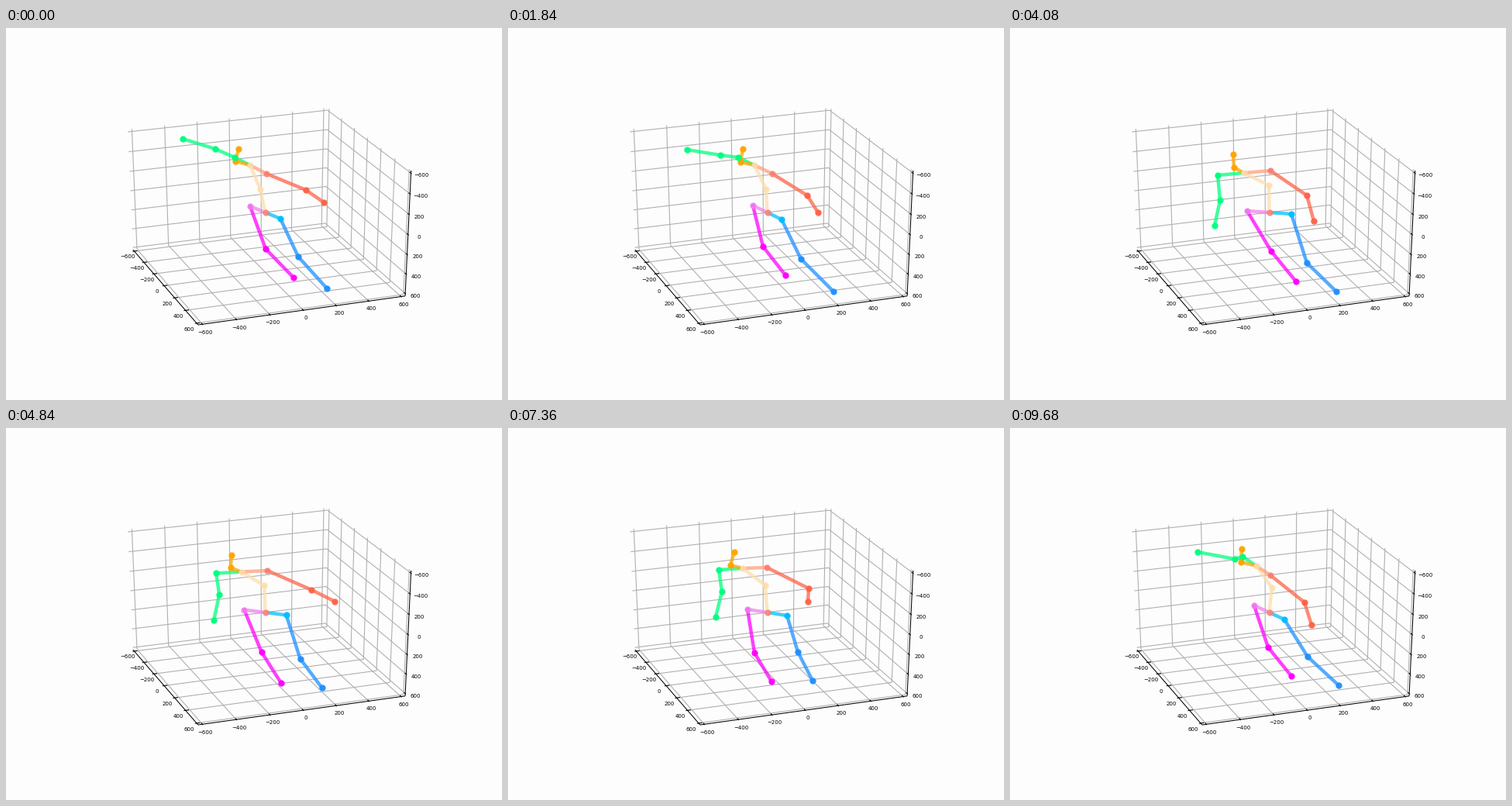
These frames come from a looping animation (640x480 px, 9.72 s). A matplotlib script:

```python
import numpy as np
import matplotlib.pyplot as plt
from matplotlib.animation import FuncAnimation
from matplotlib.collections import LineCollection

W, H, DPI = 640, 480, 100
FRAMES, STEP = 243, 40

# Camera and box
AZIM, ELEV, DIST = np.radians(-20), np.radians(27), 10
CENTER = np.array([334.7, 237.5])
SCALE = np.array([2681, 1998])
FLAT = 0.855                    # box height relative to its width
EDGE = 25 / 48                  # half width of the box, ticks reach 0.5
TICKS = np.linspace(-0.5, 0.5, 7)


def project(x, y, z):
    """Box coordinates to stage pixels; z points up."""
    z = z * FLAT
    ca, sa, ce, se = np.cos(AZIM), np.sin(AZIM), np.cos(ELEV), np.sin(ELEV)
    right = -sa * x + ca * y
    up = -se * (ca * x + sa * y) + ce * z
    depth = DIST - (ce * (ca * x + sa * y) + se * z)
    return CENTER + SCALE * np.array([right, -up]) / depth


def path(*points):
    return [project(*p) for p in points]


fig = plt.figure(figsize=(W / DPI, H / DPI), dpi=DPI, facecolor="#fdfdfd")
ax = fig.add_axes([0, 0, 1, 1])
ax.set_xlim(0, W)
ax.set_ylim(H, 0)
ax.axis("off")


def draw_box():
    e, pad, out, inn = EDGE, 0.037, 0.0083, 0.0167
    grid, marks = [], []
    for t in TICKS:
        grid += [
            path((t, -e, -e), (t, e, -e), (t, e, e)),
            path((e, t, -e), (-e, t, -e), (-e, t, e)),
            path((e, e, t), (-e, e, t), (-e, -e, t)),
        ]
        marks += [
            path((t, -e - out, -e), (t, -e + inn, -e)),
            path((e + out, t, -e), (e - inn, t, -e)),
            path((e + out, e, t), (e - inn, e, t)),
        ]
    edges = [
        path((-e, -e, -e), (e, -e, -e)),
        path((e, -e, -e), (e, e, -e)),
        path((e, e, -e), (e, e, e)),
    ]
    ax.add_collection(LineCollection(grid, colors="#b0b0b0", linewidths=0.8))
    ax.add_collection(LineCollection(edges + marks, colors="black", linewidths=0.75))

    names = ["−600", "−400", "−200", "0", "200", "400", "600"]
    heights = ["600", "400", "200", "0", "200", "−400", "−600"]
    o = e + pad
    for t, name, height in zip(TICKS, names, heights):
        spots = [((t, -o, -o), name), ((e + pad, t, -o), name), ((o, o, t), height)]
        for spot, text in spots:
            x, y = project(*spot)
            ax.text(x, y + 1, text, size=5, ha="center", va="center")


draw_box()

# Key poses of each joint, in stage pixels
POSE_T = [0, 1.84, 3.12, 4.08, 5.68, 7.36, 9.68]
PELVIS = (334.5, 238)
LEGS = {
    "hip_r": [(315, 230), (316, 229), (311, 231), (306, 236), (309, 233), (309, 234), (315, 229)],
    "knee_r": [(335, 285), (329, 282), (338, 286), (337, 288), (321, 290), (318, 290), (333, 283)],
    "foot_r": [(371, 322), (358, 319), (376, 327), (369, 327), (342, 331), (340, 327), (363, 320)],
    "knee_l": [(377, 295), (378, 298), (369, 306), (383, 303), (375, 292), (374, 289), (384, 295)],
    "foot_l": [(414, 336), (420, 340), (412, 341), (421, 340), (397, 331), (393, 326), (424, 332)],
}
TRUNK = {
    "spine": [(328, 208), (333, 208), (343, 204), (334, 203), (333, 204), (332, 203), (338, 206)],
    "chest": [(315, 177), (318, 177), (306, 189), (302, 187), (306, 184), (303, 181), (318, 178)],
    "nose": [(296, 172), (300, 173), (294, 180), (289, 180), (291, 181), (287, 177), (298, 173)],
    "head": [(300, 156), (303, 156), (293, 163), (288, 163), (294, 165), (292, 160), (299, 156)],
}
ARMS = {
    "arm_g": [(295, 167), (297, 167), (282, 180), (268, 190), (275, 184), (272, 183), (300, 166)],
    "elbow_g": [(270, 156), (274, 164), (284, 212), (271, 222), (280, 207), (276, 211), (290, 169)],
    "hand_g": [(228, 143), (231, 157), (276, 249), (264, 255), (273, 240), (268, 244), (242, 160)],
    "arm_o": [(336, 188), (341, 188), (330, 199), (336, 184), (338, 184), (334, 180), (336, 190)],
    "elbow_o": [(387, 209), (386, 216), (344, 238), (383, 216), (393, 211), (388, 207), (380, 225)],
    "hand_o": [(410, 225), (400, 238), (312, 266), (392, 249), (393, 229), (387, 224), (389, 254)],
}
# Swings between the key poses
SWINGS = {
    "foot_l": {1.0: (427, 345), 3.8: (425, 342)},
    "elbow_g": {1.0: (263, 157)},
    "hand_g": {1.0: (218, 142), 2.5: (245, 200), 9.04: (268, 222)},
    "elbow_o": {2.5: (398, 204), 4.45: (394, 208)},
    "hand_o": {2.5: (440, 208), 4.45: (433, 222)},
}
REST = 8.3      # the stance is held until here


def smooth(t, times, values):
    """Monotone cubic through the keys, without overshoot."""
    h = np.diff(times)
    slope = np.diff(values) / h
    tangent = np.zeros(len(times))
    a, b = slope[:-1], slope[1:]
    same = a * b > 0
    tangent[1:-1][same] = (2 * a * b)[same] / (a + b)[same]
    tangent[0], tangent[-1] = slope[0], slope[-1]
    i = np.clip(np.searchsorted(times, t, side="right") - 1, 0, len(h) - 1)
    u = (t - times[i]) / h[i]
    return (
        (1 + 2 * u) * (1 - u) ** 2 * values[i]
        + u * (1 - u) ** 2 * h[i] * tangent[i]
        + u * u * (3 - 2 * u) * values[i + 1]
        + u * u * (u - 1) * h[i] * tangent[i + 1]
    )


def make_tracks():
    t = np.arange(FRAMES) * STEP / 1000
    tracks = {"pelvis": np.tile(PELVIS, (FRAMES, 1))}
    for joint, points in {**LEGS, **TRUNK, **ARMS}.items():
        keys = dict(zip(POSE_T, points))
        keys[REST] = points[5]
        keys.update(SWINGS.get(joint, {}))
        times = np.array(sorted(keys), float)
        xy = np.array([keys[k] for k in sorted(keys)], float)
        tracks[joint] = np.column_stack([smooth(t, times, c) for c in xy.T])
    tracks["hip_l"] = 2 * tracks["pelvis"] - tracks["hip_r"]
    return tracks


TRACKS = make_tracks()

BONES = [
    ("pelvis", "hip_r", "violet"), ("hip_r", "knee_r", "magenta"),
    ("knee_r", "foot_r", "magenta"), ("pelvis", "hip_l", "deepskyblue"),
    ("hip_l", "knee_l", "dodgerblue"), ("knee_l", "foot_l", "dodgerblue"),
    ("chest", "arm_g", "springgreen"), ("arm_g", "elbow_g", "springgreen"),
    ("elbow_g", "hand_g", "springgreen"), ("chest", "nose", "orange"),
    ("nose", "head", "orange"), ("pelvis", "spine", "navajowhite"),
    ("spine", "chest", "navajowhite"), ("chest", "arm_o", "lightsalmon"),
    ("arm_o", "elbow_o", "tomato"), ("elbow_o", "hand_o", "tomato"),
]
JOINTS = {
    "hip_r": "violet", "knee_r": "magenta", "foot_r": "magenta",
    "hip_l": "deepskyblue", "knee_l": "dodgerblue", "foot_l": "dodgerblue",
    "spine": "navajowhite", "nose": "orange", "head": "orange",
    "arm_g": "springgreen", "elbow_g": "springgreen", "hand_g": "springgreen",
    "chest": "navajowhite", "arm_o": "salmon", "elbow_o": "tomato",
    "hand_o": "tomato", "pelvis": "salmon",
}
FAINT = {"spine", "chest", "hip_r", "arm_o", "pelvis"}

bones = [
    ax.plot([], [], color=c, lw=3.2, alpha=0.75, solid_capstyle="projecting", zorder=3)[0]
    for _, _, c in BONES
]
dots = {
    j: ax.plot([], [], "o", color=c, ms=6, mew=0, zorder=4,
               alpha=0.85 if j in FAINT else 0.95)[0]
    for j, c in JOINTS.items()
}


def update(i):
    for line, (a, b, _) in zip(bones, BONES):
        line.set_data(*np.array([TRACKS[a][i], TRACKS[b][i]]).T)
    for joint, dot in dots.items():
        x, y = TRACKS[joint][i]
        dot.set_data([x], [y])
    return bones + list(dots.values())


anim = FuncAnimation(fig, update, frames=FRAMES, interval=STEP, repeat=True,
                     repeat_delay=0, cache_frame_data=False)
plt.show()
```
